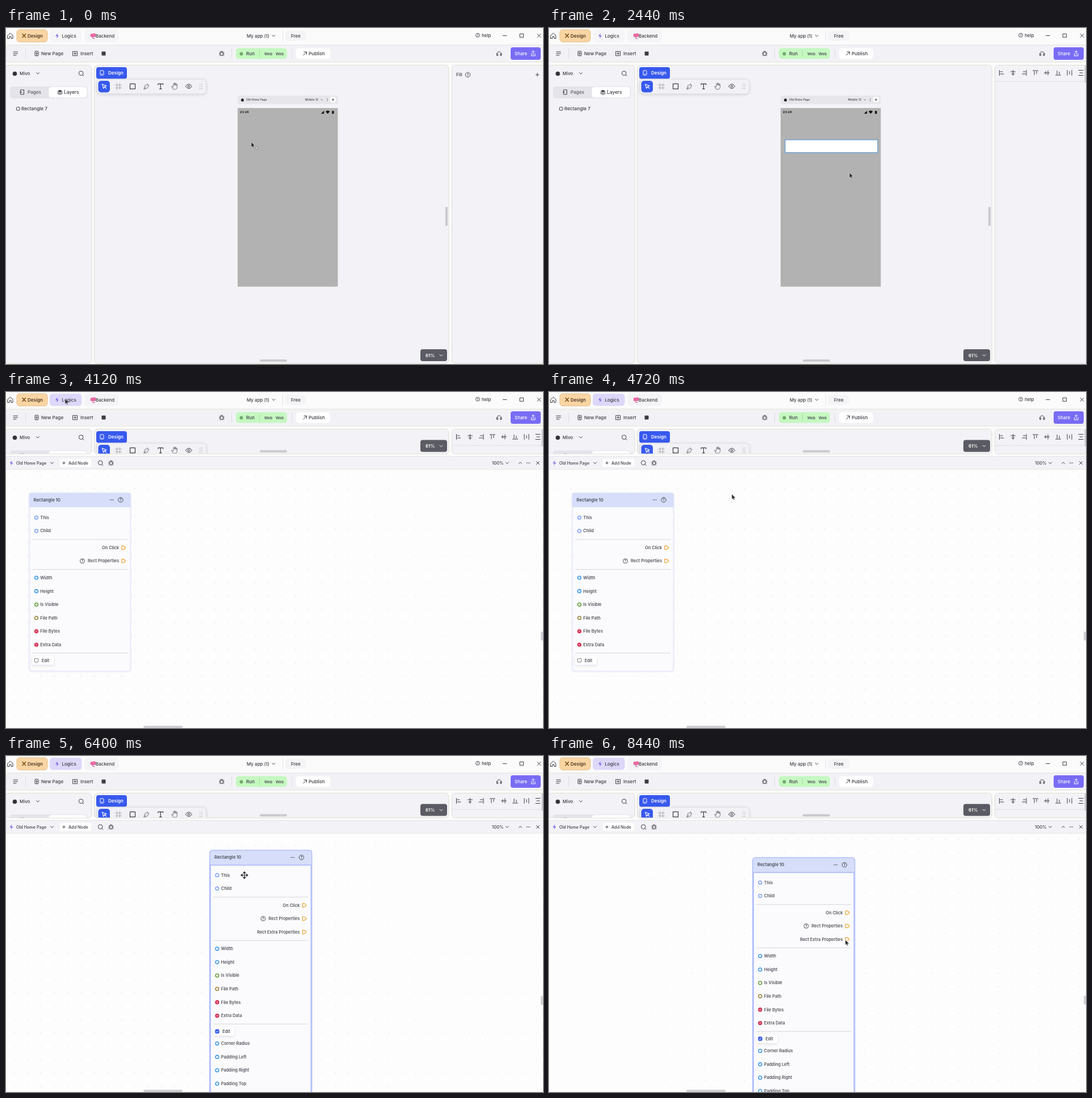
Recreate the animation shown at these times as an HTML page. Size 946 by 592 pixels, loop 8480 ms.

```html
<!DOCTYPE html>
<html lang="en">
<head>
<meta charset="utf-8">
<title>App builder</title>
<style>
html, body { margin: 0; width: 100%; height: 100%; overflow: hidden; background: #fbfbfc; }
svg { display: block; width: 946px; height: 592px; }
text { font-family: Inter, Roboto, sans-serif; white-space: pre; }
</style>
</head>
<body>
<svg id="stage" viewBox="0 0 946 592" xmlns="http://www.w3.org/2000/svg"></svg>
<script>
const INK = '#3c3c44', BLUE = '#3759ee', PIN = '#1e88e5', OLIVE = '#94751c', STEP = 23.58, LOOP = 8480;

// Markup helpers; text is centred vertically on y.
const text = (x, y, s, size = 8.1, fill = INK, weight = 500, anchor = 'start') =>
  `<text x="${x}" y="${y + size * .36}" font-size="${size}" fill="${fill}" font-weight="${weight}" text-anchor="${anchor}">${s}</text>`;
const box = (x, y, w, h, fill, r = 0, more = '') =>
  `<rect x="${x}" y="${y}" width="${w}" height="${h}" rx="${r}" fill="${fill}" ${more}/>`;
const line = (d, stroke = INK, w = 1, fill = 'none') =>
  `<path d="${d}" fill="${fill}" stroke="${stroke}" stroke-width="${w}" stroke-linecap="round" stroke-linejoin="round"/>`;
const solid = (d, fill = INK) => `<path d="${d}" fill="${fill}"/>`;
const disc = (x, y, r, fill, stroke = 'none', w = 1) =>
  `<circle cx="${x}" cy="${y}" r="${r}" fill="${fill}" stroke="${stroke}" stroke-width="${w}"/>`;
const at = (x, y, s, id = '') => `<g ${id && `id="${id}"`} transform="translate(${x} ${y})">${s}</g>`;
const group = (id, s, more = '') => `<g id="${id}" ${more}>${s}</g>`;

const down = (x, y) => line(`M${x - 2.5} ${y - 1.2}l2.5 2.5 2.5-2.5`);
const plus = (x, y, r = 2.8) => line(`M${x - r} ${y}h${2 * r}M${x} ${y - r}v${2 * r}`);
const cross = (x, y, r = 2.6) => line(`M${x - r} ${y - r}l${2 * r} ${2 * r}m0 ${-2 * r}l${-2 * r} ${2 * r}`);
const search = (x, y) => disc(x - .3, y - .3, 3.8, 'none', INK) + line(`M${x + 2.5} ${y + 2.5}l2 2`);
const help = (x, y, r = 4.2) => disc(x, y, r, 'none', INK, .9) + text(x, y, '?', r * 1.6, INK, 600, 'middle');
const bolt = (x, y) => solid(`M${x + 1} ${y - 4.5}l-4 5h3l-1 4 4-5h-3z`, '#7462ee');
const dots = (x, y) => [-2.5, 0, 2.5].map(d => disc(x + d, y, .8, INK)).join('');
const bug = (x, y) => line(`M${x - 4} ${y - 2}h8M${x - 4.5} ${y + .5}h2m5 0h2M${x - 4} ${y + 3.5}l2-1m4 0l2 1M${x - 1.5} ${y - 4.5}l1 1.5m2-1.5l-1 1.5`, INK, .9)
  + box(x - 2.5, y - 3, 5, 7, '#d8d8de', 2.5, `stroke="${INK}"`);
const phone = (x, y, c = INK) => line(`M${x - 2} ${y - 4}h4q1 0 1 1v6q0 1-1 1h-4q-1 0-1-1v-6q0-1 1-1M${x - .7} ${y + 2.2}h1.4`, c);

const topBar = () =>
  line('M3 13l4.5-4 4.5 4v5.5h-3v-3.5h-3v3.5h-3z') +
  box(19, 3, 54, 21.5, '#f9d5a4', 5, 'stroke="#e9bf85"') +
  line('M29 10.5l5.5 6M34.5 10.5l-5.5 6', '#7b4b12', 1.5) + text(38, 13.7, 'Design', 8, '#4d3720', 600) +
  box(77, 3, 56.5, 21.5, '#f5f5f7', 5, 'id="logicTab"') + bolt(90, 13.7) + text(98.5, 13.7, 'Logics', 8) +
  box(138, 3, 61, 21.5, '#f4f4f6', 5) +
  disc(151.5, 12.5, 2.8, '#ec69a4') + disc(155.5, 12.2, 3, '#ec69a4') + line('M149 15h9M153 16v2.5h3', '#d24a8c', 1.2) +
  text(158, 13.7, 'Backend', 8) +
  text(424, 13.7, 'My app (1)', 8) + down(471.5, 13.7) + line('M487.5 5v18', '#e3e3e8') +
  box(491.5, 5, 37, 17.5, '#f4f4f6', 5) + text(510.5, 13.7, 'Free', 8, INK, 500, 'middle') +
  help(831, 12.7, 3.4) + text(838, 12.7, 'help', 8) +
  line('M875.5 13.5h6.5M905.5 10.3h6v6h-6z') + cross(939, 13.5, 3);

const toolBar = () =>
  box(-1, 30, 960, 30, '#f2f2f6', 6, 'stroke="#e2e2da"') +
  line('M13 42h7.5M13 45h7.5M13 48h5') + line('M34.5 37v16M397.5 37v16M503.5 37v16', '#dadae0') +
  phone(54, 45) + line('M52.5 44.5h3M54 43v3') + text(62, 45, 'New Page') +
  line('M118 41.3h7.5v7.5h-7.5z') + plus(121.7, 45, 2) + text(131, 45, 'Insert', 8.2) +
  box(168.5, 41.5, 7, 7, INK, 1) + bug(380, 45) +
  box(405, 35.5, 90, 19, '#c5f8c1', 5) + disc(414.5, 45.5, 3, '#6fa86a') + text(423, 45, 'Run', 8.2) +
  line('M446.5 39v12', '#a5dca2') + text(455, 45.3, 'Web', 6.6) + text(475, 45.3, 'Web', 6.6) +
  box(511, 35.5, 60, 19, '#fff', 5) + line('M524 48l5-5.5M525 42h4.5v4.5') + text(533, 45, 'Publish', 8.2) +
  line('M864.5 46a4.2 4.2 0 0 1 8.4 0M864.5 46v2.5h2v-3h-2M872.9 46v2.5h-2v-3h2') +
  box(889, 34, 53, 22, '#796cf5', 4) + text(896, 45, 'Share', 8, '#fff', 500) +
  line('M925.5 45v4h6.5v-4M928.7 47v-6.5m-2.3 2l2.3-2.3 2.3 2.3', '#fff');

const leftPanel = () =>
  disc(15.5, 80.5, 3.8, '#333338') + text(24, 80, 'Mivo', 7.9) + down(56, 79.8) + search(132.5, 80) +
  box(7, 103, 137, 21, '#e4e4ea', 5) + box(75.5, 104, 67, 18.5, '#fff', 4.5) +
  line('M26 109h5.5v8h-5.5zM24.5 113h3.5') + text(38, 113.3, 'Pages', 8.1, '#5c5c66') +
  solid('M95 109l4.5 2.3-4.5 2.3-4.5-2.3z') + line('M90.8 113.3l4.2 2.1 4.2-2.1M90.8 115.3l4.2 2.1 4.2-2.1') + text(102, 113.3, 'Layers', 8.3) +
  box(18.5, 139.5, 5.5, 5.5, 'none', 1, `stroke="${INK}"`) + text(27, 142, 'Rectangle 7', 8.2);

const tools = () =>
  box(159, 69, 54, 20.5, BLUE, 4) + phone(169, 79, '#fff') + text(180, 79.2, 'Design', 8, '#fff', 600) +
  box(160, 90, 193, 26, '#f1f1f6', 6, 'stroke="#d8d8e0" filter="url(#soft)"') +
  box(0, 93, 20.5, 20.5, BLUE, 5, 'id="toolBack"') +
  line('M169.5 99l7.5 3-3.2 1.2 2.8 3.2M169.5 99l2.3 7.5 2-3.3', 'currentColor', 1.1).replace('<path', '<path id="pick"') +
  line('M195.5 97.5v11M200.5 97.5v11M192.5 100.5h11M192.5 105.5h11', '#aaaab2') +
  line('M218.5 98.3h9v9h-9z', 'currentColor', 1.2).replace('<path', '<path id="rectTool"') +
  line('M243 107.5l1.5-6 4-2 2.5 2.5-2 4zM243 107.5l4-4M248.5 98l3.5 3.5', '#777780') +
  line('M268 100v-1.7h8.6v1.7M272.3 98.3v9M270.5 107.3h3.6', INK, 1.2) +
  line('M294 104l-1.5-1.5q-1.5 0-.5 1.5l2.5 4h5q2-1.5 2-4.5v-4q-1-1-1.6 0v2-3.5q-1-1-1.7 0v3-4q-1-1-1.7 0v4-3q-1-1-1.7 0v6', '#777780') +
  line('M316.5 102.8q5.5-8 11 0q-5.5 8-11 0') + disc(322, 102.8, 1.7, 'none', INK) +
  [99, 102.8, 106.6].map(y => disc(341.7, y, .8, '#aaa') + disc(345, y, .8, '#aaa')).join('');

const device = () =>
  box(408, 119, 176.5, 15, '#e7e7eb', 3) + solid('M413.5 126.5l3-2.8 3 2.8h-.8v2.7h-4.4v-2.7z', '#111') +
  text(423, 126.4, 'Old Home Page', 4.95) + text(527, 126.4, 'Mobile 12', 5.1) +
  line('M555 126l1.2 1.2 1.2-1.2', INK, .8) + [124.3, 126.3, 128.3].map(y => disc(566, y, .6, INK)).join('') +
  box(571, 121.3, 10, 10, '#fff', 3) + plus(576, 126.3, 1.6) +
  box(408, 141, 176.5, 314.7, '#b2b2b2') + text(412, 147.7, '23:24', 5.4, '#111', 700) +
  solid('M555 151l5.2-5.3v5.3zM563 147q3.7-3 7.4 0l-3.7 4.2z', '#111') + box(574.3, 146, 3.3, 5.3, '#111', .8) +
  group('drawn', box(416, 197, 0, 0, '#fff', 0, 'id="shape"')) +
  group('size', box(-17, 0, 34, 13, '#4a91f1', 1.5) + text(0, 6.7, '', 6.8, '#fff', 500, 'middle'));

const alignRow = () => {
  const side = (x, d) => line(`M${x + 4 * d} 74.5v9M${x + 2.5 * d} 77h${-4 * d}M${x + 2.5 * d} 81h${-6 * d}`);
  const mid = x => line(`M${x} 74.5v9M${x - 4} 77h8M${x - 2.5} 81h5`);
  const turn = (x, s) => `<g transform="rotate(90 ${x} 79)">${s}</g>`;
  return side(797.5, -1) + mid(817.5) + side(837, 1) + turn(857, side(857, -1)) + turn(877, mid(877)) +
    turn(897, side(897, 1)) + line('M913 74.5v9M921 74.5v9M917 76.5v5M933 74.5h8M933 83.5h8M935 79h5') +
    line('M786 94h160', '#dedee2') + box(943.5, 66, 2.5, 30, '#cbcbd0', 1);
};

const rightPanel = () =>
  group('fillHead', text(793, 82.3, 'Fill', 7.9) + help(813.5, 82.3)) + group('fillAdd', plus(936, 82.3)) +
  group('fillPage', cross(936, 82.3) + box(793, 100, 15, 15, '#b2b2b6', 3) +
    box(813, 99, 79, 16.5, '#fafafc', 3) + text(822, 107.5, '#B5B5B5', 7.3, '#666') +
    box(900, 99, 39, 16.5, '#fafafc', 3) + text(907, 107.5, '100%', 7.6, '#555') +
    line('M786 136.5h160', '#dedee2') + text(793, 149.2, 'Grid', 7.8) + help(818.5, 149.2) +
    box(793, 178, 79, 19, '#fff', 3) + text(799, 187.7, 'None', 8) + down(864, 187.7) + text(876, 189.5, 'Grid Layout', 7.7)) +
  group('align', alignRow());

// Node card, in coordinates of its first resting place.
const label = (x, y, s, anchor) => text(x, y, s, 7.4, '#55555d', 600, anchor);
const input = (y, s, c, fill = '#fff') => disc(53.5, y, 2.9, fill, c, 1.3) + label(60.3, y, s);
const output = (y, s) => label(199, y, s, 'end') + line(`M203.8 ${y - 3.2}h2.8q3.2 1.2 4 3.2q-.8 2-4 3.2h-2.8z`, '#eea32c', 1.2);
const rule = y => line(`M47 ${y}h166.5`, '#d5d5dc');
const extras = [
  ['Corner Radius'], ['Padding Left'], ['Padding Right'], ['Padding Top'], ['Padding Bottom'], ['Radius'],
  ['Fill', '#16161a'], ['Border Fill', '#16161a'], ['Border Width'], ['Shadow Fill', '#16161a'],
  ['Shadow X'], ['Shadow Y'], ['Shadow Blur'], ['Inner Shadow', OLIVE], ['Image Fill', '#16161a'], ['Image Fit', OLIVE],
  ['On Rect Default Prop Update', OLIVE], ['On Drop Down Menu Default Prop Update', OLIVE], ['On Drop Down Menu Extra Prop Update', OLIVE]
];
const card = () =>
  box(41, 178, 178.5, 314, '#fbfbfe', 4, 'id="cardBack" stroke-width="3"') +
  solid('M41 203v-21q0-4 4-4h170.5q4 0 4 4v21z', '#d6def9') +
  group('cardLine', line('M41 203.5h178.5', '#b4c1fb', 2)) +
  text(48.5, 190, 'Rectangle 10', 7.7, '#4a4e5c', 600) + dots(186.3, 190) + help(202, 190) +
  input(221.3, 'This', '#6a92ee') + input(244.8, 'Child', '#6a92ee') + rule(260) +
  output(274.3, 'On Click') + output(297.8, 'Rect Properties') + help(134.5, 297.8, 4) +
  group('moreOut', output(321.4, 'Rect Extra Properties')) +
  group('lower', rule(312.7) + input(327.3, 'Width', PIN) + input(350.9, 'Height', PIN) +
    input(374.5, 'Is Visible', '#4b8f1c') + input(398, 'File Path', '#84701c') +
    input(421.6, 'File Bytes', '#c9143b', '#ee7389') + input(445.2, 'Extra Data', '#c9143b', '#ee7389') + rule(460) +
    box(46, 465, 38, 15.5, '#fff', 3, 'filter="url(#soft)"') +
    box(50.3, 469.6, 6.5, 6.5, '#fff', 1.5, 'stroke="#777" id="check"') + label(62.7, 473, 'Edit') +
    group('more', line('M51.8 473l1.3 1.4 2.3-2.8', '#fff') +
      extras.map(([s, c = PIN], i) => input(494.3 + i * STEP, s, c)).join('')));

const logic = () =>
  box(0, 113.5, 946, 479, '#fdfdfe') + box(0, 136, 946, 456, 'url(#grid)') +
  `<g clip-path="url(#board)">${at(0, 0, card(), 'node')}</g>` +
  box(0, 113.5, 946, 22.5, '#f3f3f7') + line('M0 113.5h946M0 136.2h946', '#e0e0e2', .8) +
  bolt(9.5, 125) + text(18, 125, 'Old Home Page', 7.2) + down(81, 125) +
  box(95, 118, 55, 14, '#fff', 3) + plus(102, 125, 2.2) + text(110, 125.2, 'Add Node', 7.3) +
  search(166.5, 125) + bug(185, 125) + text(856, 125, '100%', 7.7) + down(883, 125) +
  line('M903.5 126.2l2.5-2.5 2.5 2.5') + dots(920, 125) + cross(937, 125) +
  box(242, 588, 69, 4, '#cfcfd4', 2) + box(942, 422, 4, 16, '#cfcfd4', 2, 'id="thumb"');

const panel = (x, w) => box(x, 65.5, w, 525.5, '#f2f2f7', 6, 'class="panel" stroke="#deded6"');
const arms = [0, 90, 180, 270].map(a => `<path transform="rotate(${a})" d="M0 0v-5M-1.8-3.8L0-6 1.8-3.8z"/>`).join('');
const pointer = () =>
  group('arrow', '<path d="M0 0v9.3l2.2-1.9 1.5 3.1 1.5-.7-1.5-3h3.1z" fill="#26262b" stroke="#eee" stroke-width=".6"/>') +
  group('badge', box(7, 9, 5, 3.2, '#ddd', 1, 'stroke="#666" stroke-width=".7"')) +
  group('aim', line('M-4.5 0h9M0-4.5v9', '#222', 1.1) + disc(4.3, 2.5, 1.6, '#ccc', '#555', .7)) +
  group('move', arms, 'fill="#333" stroke="#333" stroke-width="1.2"');

stage.innerHTML = `<defs>
  <filter id="soft" x="-20%" y="-40%" width="140%" height="200%"><feDropShadow dx="0" dy="1.5" stdDeviation="2" flood-opacity=".12"/></filter>
  <pattern id="grid" width="${STEP}" height="${STEP}" patternUnits="userSpaceOnUse">${disc(14.5, 5.5, .9, '#e3e2dc')}</pattern>
  <clipPath id="work"><rect id="workBox" x="0" y="65" width="946" height="526"/></clipPath>
  <clipPath id="board"><rect y="136" width="946" height="456"/></clipPath></defs>` +
  box(0, 0, 946, 592, '#fbfbfc') + topBar() + toolBar() +
  panel(-1, 152) + panel(155.5, 624.5) + panel(785.5, 180) +
  `<g clip-path="url(#work)">${leftPanel() + group('canvas', device() + box(774, 315, 4, 34, '#c9c9ce', 2)) + tools() + rightPanel()}</g>` +
  at(0, 0, box(447, 584, 48, 4, '#c9c9ce', 2) + box(730, 566, 47, 21, '#5b5b64', 4) +
    text(739, 576.7, '61%', 8, '#fff', 600) + line('M764 575.5l2.5 2.5 2.5-2.5', '#fff'), 'dock') +
  group('logic', logic()) + at(0, 0, pointer(), 'mouse');

// Each key is [time, ...values]; motion eases between keys.
const smooth = u => u * u * (3 - 2 * u);
function track(keys, t, ease = smooth) {
  let i = keys.findIndex(k => k[0] > t);
  if (i < 0) return keys[keys.length - 1].slice(1);
  if (!i) return keys[0].slice(1);
  const a = keys[i - 1], b = keys[i], u = ease((t - a[0]) / (b[0] - a[0]));
  return a.slice(1).map((v, n) => v + (b[n + 1] - v) * u);
}
const path = [
  [0, 432, 201], [160, 432, 201], [600, 223, 101], [760, 223, 101], [1120, 416, 197], [1240, 416, 197],
  [1640, 494.5, 216.7], [2000, 579, 219.5], [2160, 579, 219.5], [2720, 480, 290], [2920, 480, 290],
  [3400, 485, 215], [3640, 485, 215], [3960, 104, 12], [4120, 104, 12], [4700, 322, 180], [4760, 322, 180],
  [5080, 54, 470], [5240, 54, 470], [5480, 102, 190], [5560, 102, 190], [6080, 420.5, 191.7],
  [6160, 420.5, 191.7], [6360, 420, 210], [6440, 420, 210], [7160, 431, 356], [7720, 431, 356], [8400, 522, 324]
];
const carry = [[5560, 0, 0], [6080, 318.5, 1.7]];
const scroll = [[6320, 0], [6400, -13], [7160, -353.5], [7560, -353.5], [8160, 0]];

const $ = id => document.getElementById(id);
const show = (id, on) => { $(id).style.display = on ? '' : 'none'; };
const set = (id, o) => { for (const k in o) $(id).setAttribute(k, o[k]); };
const panels = document.querySelectorAll('.panel');

function draw(t) {
  const [x, y] = track(path, t);
  const between = (a, b) => t >= a && t < b;
  const open = t >= 4120, drawing = between(680, 2040), dragging = between(1240, 2040);
  const chosen = between(2040, 2840) || t >= 3600, expanded = t >= 5160, held = t >= 5520;

  set('mouse', { transform: `translate(${x} ${y})` });
  const moving = between(5520, 8320), aiming = between(800, 2040);
  show('arrow', !moving && !aiming);
  show('badge', t < 560);
  show('aim', aiming);
  show('move', moving);

  set('toolBack', { x: drawing ? 212.5 : 162.5 });
  $('pick').style.color = drawing ? INK : '#fff';
  $('rectTool').style.color = drawing ? '#fff' : INK;

  const [ex, ey] = track(path, Math.min(Math.max(t, 1240), 2000));
  const w = ex - 416, h = ey - 197;
  show('drawn', t >= 1240);
  show('size', dragging);
  set('shape', { width: w, height: h, stroke: chosen || between(3280, 3600) ? '#4d8fd6' : 'none' });
  set('size', { transform: `translate(${416 + w / 2 + 1} ${ey + 5.5})` });
  $('size').querySelector('text').textContent = `${Math.round(w * 2.484)} × ${Math.round(h * 2.484)}`;

  show('fillHead', !chosen);
  show('fillAdd', t < 2040);
  show('fillPage', between(2840, 3600));
  show('align', chosen);

  set('logicTab', { fill: open ? '#ddd8f8' : '#f5f5f7' });
  set('workBox', { height: open ? 43.5 : 526 });
  panels.forEach(p => p.setAttribute('height', open ? 43.5 : 525.5));
  set('dock', { transform: `translate(0 ${open ? -481.5 : 0})` });
  show('canvas', !open);
  show('logic', open);
  if (!open) return;

  const [pan] = track(scroll, t), [dx, dy] = track(carry, t);
  set('node', { transform: `translate(${dx} ${dy + pan})` });
  set('grid', { patternTransform: `translate(0 ${pan})` });
  set('thumb', { y: 422 - pan * .034 });
  set('cardBack', { height: expanded ? 314 + STEP * (extras.length + 1) : 314, stroke: held ? '#b4c1fb' : '#eceefa' });
  set('lower', { transform: `translate(0 ${expanded ? STEP : 0})` });
  set('check', { fill: expanded ? BLUE : '#fff', stroke: expanded ? BLUE : '#777' });
  show('cardLine', held);
  show('moreOut', expanded);
  show('more', expanded);
}

const start = performance.now();
function tick() {
  draw((performance.now() - start) % LOOP);
  requestAnimationFrame(tick);
}
tick();
</script>
</body>
</html>
```
